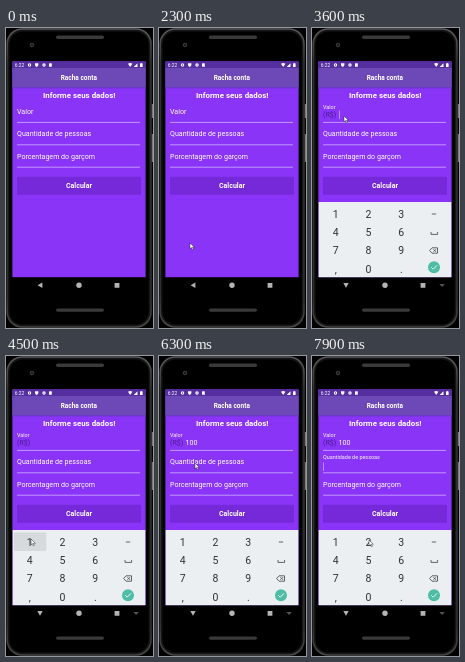
An HTML page for the animation above (8 s loop, 147 by 300 pixels).

```html
<!DOCTYPE html>
<html lang="pt-BR">
<head>
<meta charset="utf-8">
<title>Racha conta</title>
<style>
  html, body { margin: 0; width: 100%; height: 100%; overflow: hidden; background: #000; }
  svg { display: block; width: 147px; height: 300px; }
  text { font-family: Roboto, "Open Sans", sans-serif; fill: #fff; }
  .mid { text-anchor: middle; }
  .label { font-size: 7.1px; }
  .digit { font-size: 10.5px; fill: #2b3236; text-anchor: middle; }
  .line { fill: none; stroke: #3b4347; stroke-width: .8; }
</style>
</head>
<body>
<svg viewBox="0 0 147 300">
  <defs>
    <clipPath id="area"><rect x="6.4" y="33" width="133.2" height="226"/></clipPath>
    <linearGradient id="rim" x2="0" y2="1">
      <stop offset="0" stop-color="#5a5a5a"/>
      <stop offset=".12" stop-color="#303030"/>
      <stop offset=".9" stop-color="#303030"/>
      <stop offset="1" stop-color="#484848"/>
    </linearGradient>
  </defs>

  <!-- phone body -->
  <rect width="147" height="300"/>
  <path d="M146.2 76v14M146.2 106v28" stroke="#858585" stroke-width="1.4"/>
  <rect x="1.2" y="1" width="143.8" height="298" rx="15" fill="#161616" stroke="url(#rim)" stroke-width="1.6"/>
  <rect x="3.5" y="3.5" width="139.2" height="293" rx="13"/>
  <g fill="#3a3a3a">
    <rect x="50" y="7.6" width="48" height="3.4" rx="1.7"/>
    <rect x="50" y="280.4" width="48" height="3.4" rx="1.7"/>
  </g>
  <circle cx="26" cy="17" r="2.3" fill="#34363a"/>
  <circle cx="26" cy="17" r="1" fill="#111"/>

  <!-- app -->
  <rect x="6.4" y="33.4" width="133.2" height="215.8" fill="#8a34f8"/>
  <rect x="6.4" y="33.4" width="133.2" height="6.6" fill="#552ea0"/>
  <rect x="6.4" y="40" width="133.2" height="19.5" fill="#6d49b8"/>
  <rect x="6.4" y="59.5" width="133.2" height=".8" fill="#6733bd"/>
  <text x="8.8" y="38.9" font-size="4.9">6:22</text>
  <g fill="#fff">
    <circle cx="23.5" cy="37" r="1.7"/>
    <path d="M29 35.2h3.4v1.8q-.3 1.5-1.7 2-1.4-.5-1.7-2z"/>
    <circle cx="38" cy="37" r="1.7"/>
    <rect x="43" y="35.3" width="2.8" height="3.5" rx=".4"/>
    <path d="M122 35.8q2.2-1.6 4.4 0l-2.2 3.2zM131.5 35.2v3.8h-3.8zM134 35.5h.8v-.5h1v.5h.8V39H134z"/>
  </g>
  <g fill="#552ea0">
    <circle cx="23.5" cy="37" r=".7"/><circle cx="38" cy="37" r=".6"/>
  </g>
  <text class="mid" x="72.8" y="52" font-size="6.5" font-weight="700">Racha conta</text>
  <text class="mid" x="73.2" y="70.1" font-size="7.9" font-weight="700">Informe seus dados!</text>
  <path d="M11 94.4h123M11 116.8h123M11 139.2h123" stroke="#d9c3fb" stroke-width=".7"/>
  <text class="label" id="amount" x="11">Valor</text>
  <text class="label" id="people" x="11">Quantidade de pessoas</text>
  <text class="label" x="11" y="130.5">Porcentagem do garçom</text>
  <text class="label" id="prefix" x="11" y="89" style="fill:#4b1c91">(R$)</text>
  <text class="label" id="value" x="26.6" y="89"></text>
  <rect id="caret" width=".6" height="8.5" fill="#d9c3fb"/>
  <rect x="11" y="148.8" width="124" height="18" rx="1" fill="#7529d9"/>
  <text class="mid" x="73" y="159.9" font-size="7" font-weight="700">Calcular</text>

  <!-- keypad -->
  <g clip-path="url(#area)">
    <g id="pad">
      <rect x="6.4" y="174" width="133.2" height="75.2" fill="#eceff1"/>
      <rect id="press" width="32.5" height="18.3" rx="1" fill="#d6dadc"/>
      <g id="digits"></g>
      <path class="line" d="M119.8 186h4.4M119 204v2.4h6.6V204M120 219.8h5.5v5.4H120l-2.4-2.7zM121.4 221.2l2.6 2.6m0-2.6l-2.6 2.6"/>
      <circle cx="122" cy="239.2" r="6" fill="#4dbda6"/>
      <path d="M119.3 239.3l1.9 1.9 3.7-3.8" fill="none" stroke="#fff" stroke-width=".9"/>
    </g>
  </g>

  <!-- navigation -->
  <g fill="#b4b4b4">
    <path id="back" d="M36.4 254.6v5.4l-4.8-2.7z"/>
    <circle cx="73" cy="257.3" r="2.7"/>
    <rect x="108.6" y="255" width="4.8" height="4.8" rx=".4"/>
    <path id="switch" d="M127.4 256h5.4l-2.7 2.9z" fill="#555"/>
  </g>
  <path id="mouse" d="M0 0v5.8l1.4-1.2 1 2.2 1-.5-.9-2.1h1.8z" fill="#fff" stroke="#222" stroke-width=".5"/>
</svg>
<script>
  const LOOP = 8000, STEP = 100, HOLD = 300, BLINK = 500;
  const KEYS = '123456789,0.', COL = 32.8, ROW = 18.25;
  const PAD_OPENS = 3100, FOCUS = 3600, NEXT_FOCUS = 6700;

  const taps = [{ key: '1', time: 4300 }, { key: '0', time: 5000 }, { key: '0', time: 5500 }];
  // bow pushes the path sideways halfway through
  const moves = [
    { from: 2300, to: 2700, x: 32, y: 88, bow: 24 },
    { from: 3700, to: 4200, x: 25, y: 183, bow: 0 },
    { from: 4500, to: 4900, x: 60, y: 242, bow: 44 },
    { from: 5700, to: 6300, x: 36, y: 107, bow: 38 },
    { from: 6500, to: 7100, x: 86, y: 214, bow: 0 },
    { from: 7100, to: 7600, x: 57, y: 184, bow: 0 }
  ];

  const $ = id => document.getElementById(id);
  const set = (id, attrs) => {
    for (const k in attrs) $(id).setAttribute(k, attrs[k]);
  };
  const show = (id, on) => set(id, { visibility: on ? 'visible' : 'hidden' });
  const progress = (t, from, to) => Math.min(1, Math.max(0, (t - from) / (to - from)));
  const keyCell = key => {
    const i = KEYS.indexOf(key);
    return { x: i % 3 * COL, y: Math.floor(i / 3) * ROW };
  };

  $('digits').innerHTML = [...KEYS].map(key => {
    const { x, y } = keyCell(key);
    return `<text class="digit" x="${23.7 + x}" y="${189.8 + y}">${key}</text>`;
  }).join('');

  function mouseAt(t) {
    let x = 31, y = 215;
    for (const m of moves) {
      const p = progress(t, m.from, m.to);
      const ease = (1 - Math.cos(Math.PI * p)) / 2;
      x += (m.x - x) * ease + m.bow * Math.sin(Math.PI * p);
      y += (m.y - y) * ease;
      if (p < 1) break;
    }
    return `translate(${x} ${y})`;
  }

  function floatLabel(id, baseline, start, t) {
    const p = progress(t, start, start + 200);
    $(id).style.fontSize = 7.1 - 1.65 * p + 'px';
    set(id, { y: baseline - 4.9 * p });
  }

  function draw(t) {
    show('mouse', t >= moves[0].from);
    set('mouse', { transform: mouseAt(t) });

    const p = progress(t, PAD_OPENS, PAD_OPENS + 400);
    const left = (1 - p) ** 2;
    set('pad', { transform: `translate(0 ${32 * left})`, opacity: 1 - left });
    set('back', { transform: `rotate(${-90 * p} 34 257.3)` });
    show('switch', p === 1);

    const tap = taps.find(k => t >= k.time && t < k.time + HOLD);
    show('press', tap);
    if (tap) {
      const { x, y } = keyCell(tap.key);
      set('press', { x: 7.8 + x, y: 176.6 + y });
    }

    floatLabel('amount', 86, 3300, t);
    floatLabel('people', 108.2, 6400, t);
    show('prefix', t >= 3500);
    const typed = taps.filter(k => t >= k.time + HOLD);
    $('value').textContent = typed.map(k => k.key).join('');

    const resets = [FOCUS, ...typed.map(k => k.time + HOLD), NEXT_FOCUS];
    const since = t - Math.max(...resets.filter(r => r <= t));
    show('caret', t >= FOCUS && since % (2 * BLINK) < BLINK);
    set('caret', t < NEXT_FOCUS ? { x: 27 + 4 * typed.length, y: 82.5 } : { x: 11, y: 106.5 });
  }

  const origin = performance.now();
  function tick() {
    const t = (performance.now() - origin) % LOOP;
    draw(Math.floor(t / STEP) * STEP);
    requestAnimationFrame(tick);
  }
  tick();
</script>
</body>
</html>
```
